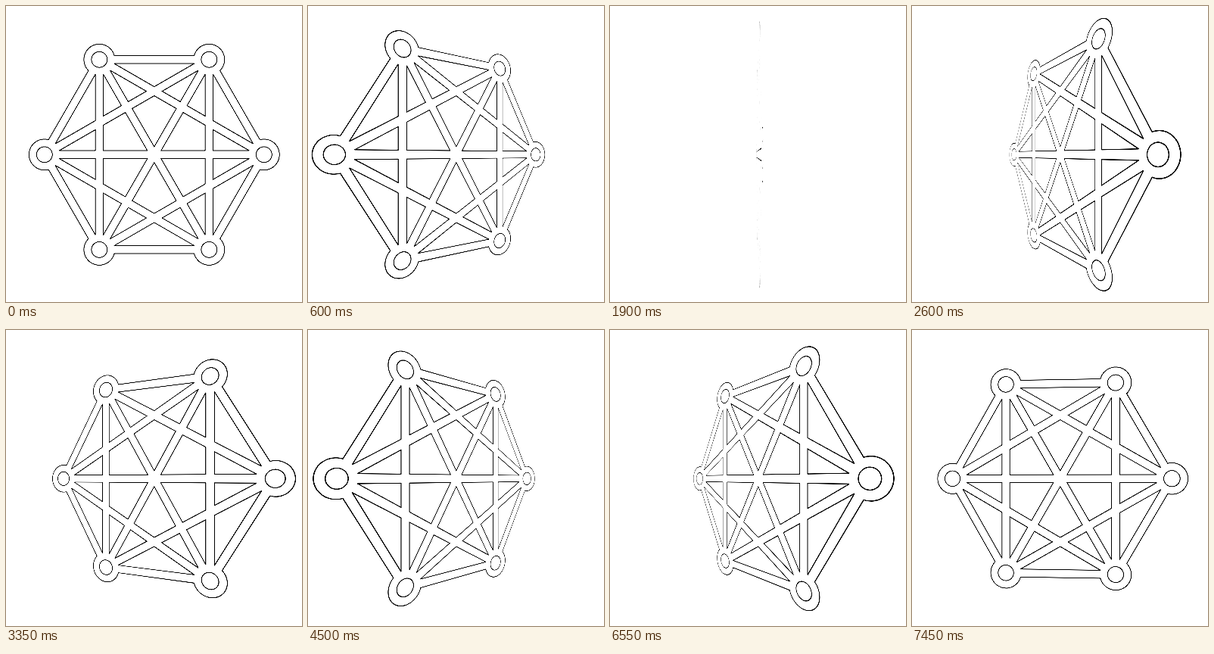
Animation of 391x391 px, one loop 7.5 s. Source, as an HTML page with a canvas:

```html
<!DOCTYPE html>
<html lang="en">
<head>
<meta charset="utf-8">
<title>Turning hexagon network</title>
<style>
html, body { margin: 0; width: 100%; height: 100%; overflow: hidden; background: #fff; }
canvas { display: block; filter: contrast(2.5); }
</style>
</head>
<body>
<canvas width="391" height="391"></canvas>
<script>
const ctx = document.querySelector('canvas').getContext('2d');
const LOOP = 7500, STEP = 50;
const CX = 195.8, CY = 196.3, DEPTH = 334;
const RADIUS = 145, RING = 20.4, HOLE = 10.4, BAR = 5.2, HALF_LINE = 0.5;

const nodes = Array.from({ length: 6 }, (_, i) => {
  const a = i * Math.PI / 3;
  return [RADIUS * Math.cos(a), RADIUS * Math.sin(a)];
});
let cos = 1, sin = 0;

// Rotate a flat point about the vertical axis and view it in perspective.
function project([x, y]) {
  const scale = DEPTH / (DEPTH + x * sin);
  return [CX + x * cos * scale, CY + y * scale];
}

function fillShape(points, color) {
  ctx.fillStyle = color;
  ctx.beginPath();
  for (const p of points) ctx.lineTo(...project(p));
  ctx.fill();
}

function disc([x, y], r, color) {
  const points = Array.from({ length: 72 }, (_, i) => {
    const a = i * Math.PI / 36;
    return [x + r * Math.cos(a), y + r * Math.sin(a)];
  });
  fillShape(points, color);
}

function bar([x1, y1], [x2, y2], half, color) {
  const length = Math.hypot(x2 - x1, y2 - y1);
  const nx = (y1 - y2) / length * half, ny = (x2 - x1) / length * half;
  fillShape([[x1 + nx, y1 + ny], [x2 + nx, y2 + ny], [x2 - nx, y2 - ny], [x1 - nx, y1 - ny]], color);
}

function network(grow, color) {
  nodes.forEach((a, i) => {
    for (const b of nodes.slice(i + 1)) bar(a, b, BAR + grow, color);
    disc(a, RING + grow, color);
  });
}

function draw(time) {
  const angle = Math.floor(time % LOOP / STEP) * STEP / LOOP * 2 * Math.PI;
  cos = Math.cos(angle);
  sin = Math.sin(angle);
  ctx.fillStyle = '#fff';
  ctx.fillRect(0, 0, 391, 391);
  // The white shape over a slightly larger black one leaves a single outline.
  network(HALF_LINE, '#000');
  network(-HALF_LINE, '#fff');
  for (const n of nodes) {
    disc(n, HOLE + HALF_LINE, '#000');
    disc(n, HOLE - HALF_LINE, '#fff');
  }
}

const start = performance.now();
function tick() {
  draw(performance.now() - start);
  requestAnimationFrame(tick);
}
tick();
</script>
</body>
</html>
```
